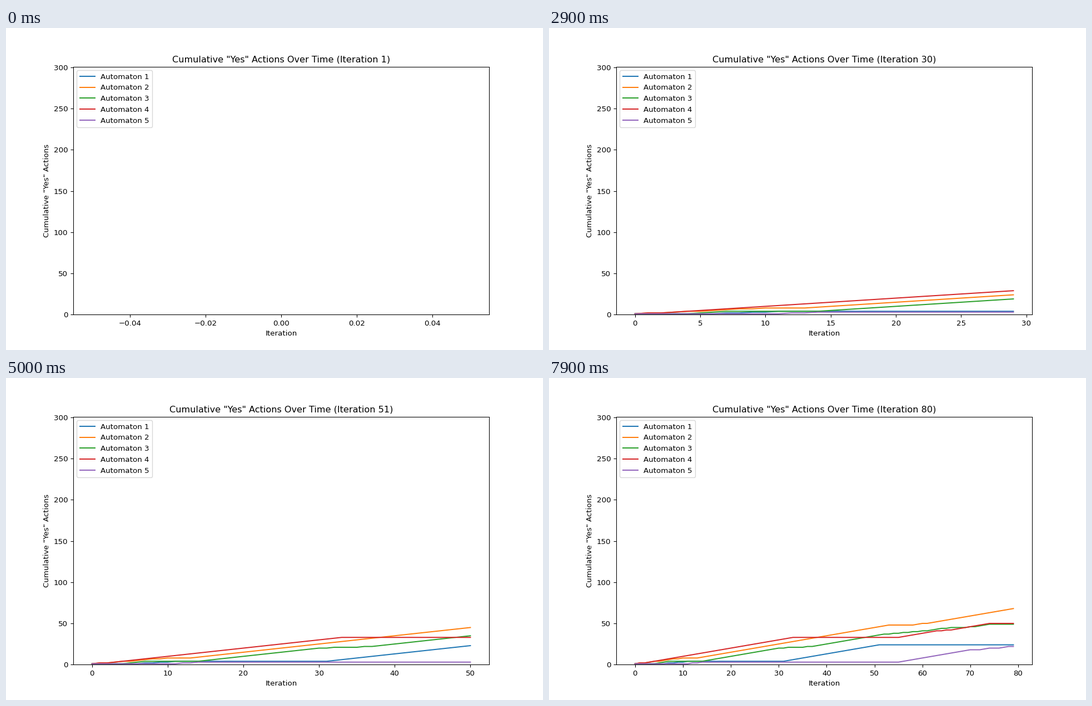
A matplotlib script that plays this animation: 966 by 580 pixels, repeating every 8000 ms.

```python
import numpy as np
import matplotlib.pyplot as plt
from matplotlib.animation import FuncAnimation

WIDTH, HEIGHT, DPI = 966, 580, 96.6
STEPS = 80
INTERVAL = 100  # ms

# Main bends (step, total) of each automaton's count
BENDS = [
    [(6, 1), (11, 4), (31, 4), (51, 24)],
    [(0, 1), (10, 8), (13, 8), (53, 48), (58, 48), (62, 51), (79, 68)],
    [(4, 1), (7, 4), (14, 4), (30, 20), (37, 22), (52, 37),
     (61, 41), (64, 44), (71, 46), (74, 49)],
    [(0, 1), (3, 3), (33, 33), (55, 33), (62, 40), (67, 43), (74, 50)],
    [(10, 1), (15, 3), (55, 3), (69, 17), (79, 22)],
]

steps = np.arange(STEPS)


def count(bends):
    """Whole-number totals that follow the bends; flat outside them."""
    return np.rint(np.interp(steps, *zip(*bends)))


totals = [count(bends) for bends in BENDS]

plt.rcParams["font.family"] = "DejaVu Sans"
# The small margin keeps rounding from losing a pixel
fig, ax = plt.subplots(figsize=((WIDTH + 1e-3) / DPI, (HEIGHT + 1e-3) / DPI),
                       dpi=DPI)
lines = [ax.plot([], [], label=f"Automaton {i}")[0]
         for i in range(1, len(totals) + 1)]
ax.set_ylim(0, 301)
ax.set_xlabel("Iteration")
ax.set_ylabel('Cumulative "Yes" Actions')
ax.legend(loc="upper left")
title = ax.set_title("")


def update(i):
    for line, total in zip(lines, totals):
        line.set_data(steps[:i + 1], total[:i + 1])
    pad = 0.05 * i if i else 0.055
    ax.set_xlim(-pad, i + pad)
    title.set_text(f'Cumulative "Yes" Actions Over Time (Iteration {i + 1})')
    return [*lines, title]


anim = FuncAnimation(fig, update, frames=STEPS, interval=INTERVAL,
                     init_func=lambda: update(0), repeat=True, repeat_delay=0)
plt.show()
```
